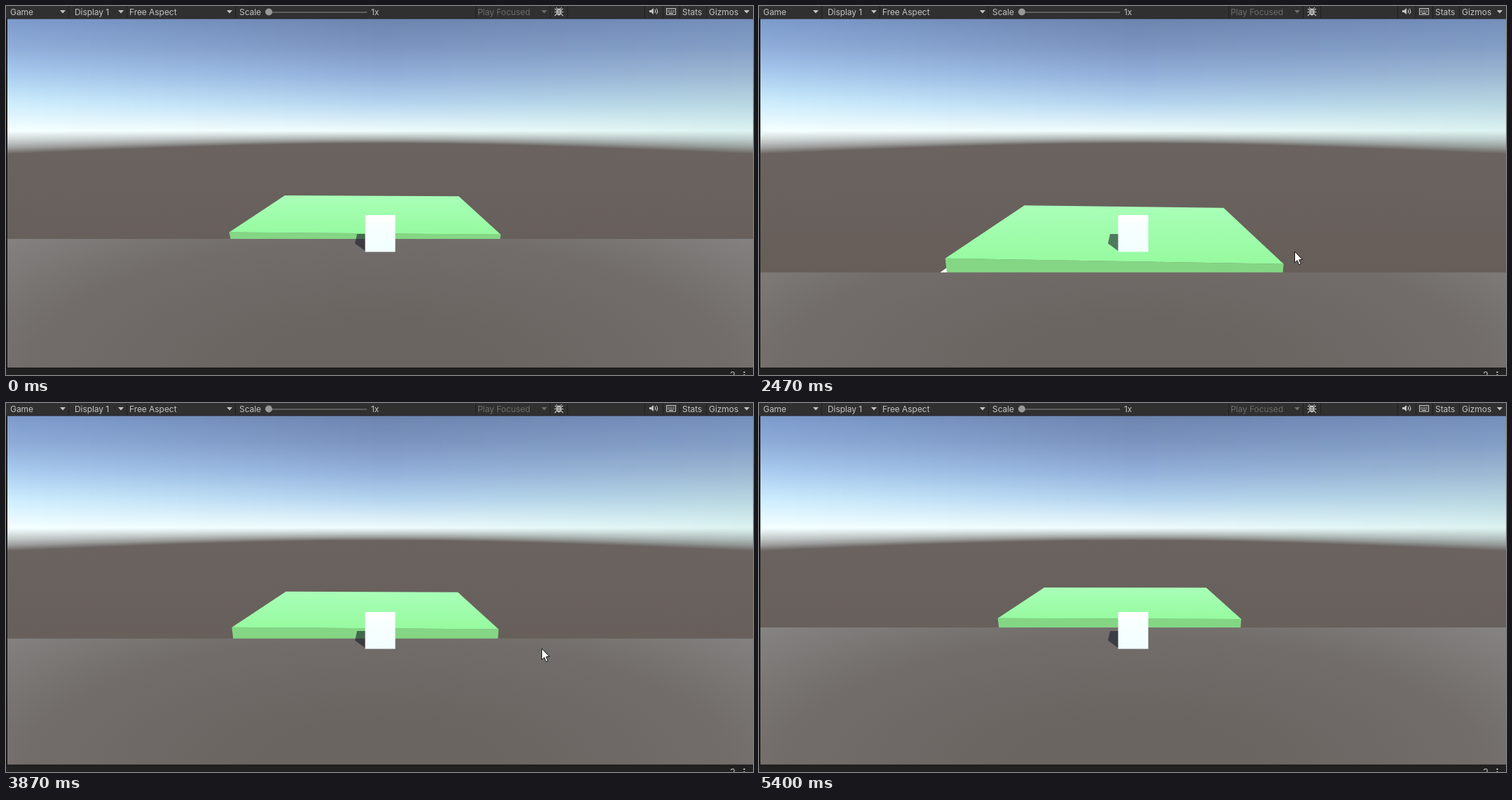
These frames come from a looping animation (1066 by 526 pixels, 5.8 s). An HTML page with a canvas:

```html
<!DOCTYPE html>
<html lang="en">
<head>
<meta charset="utf-8">
<title>Game view</title>
<style>
  html, body { margin: 0; width: 100%; height: 100%; overflow: hidden; background: #191919; }
  canvas, svg { position: absolute; left: 0; top: 0; display: block; }
  text { font: 12px Inter, Roboto, sans-serif; letter-spacing: -.06px; fill: #c4c4c4; }
  .dim { fill: #6c6c6c; }
  .icon { fill: #c4c4c4; }
  .line { fill: none; stroke: #c4c4c4; stroke-width: 1.1; }
</style>
</head>
<body>
<canvas id="scene" width="1066" height="526"></canvas>
<svg width="1066" height="526" viewBox="0 0 1066 526">
  <defs><path id="arrow" d="M0 0h8l-4 4.5z"/></defs>
  <rect width="1066" height="18" fill="#303030"/>
  <rect y="17.5" width="1066" height="1" fill="#222"/>
  <path d="M89.5 0V17M172.5 0V17M327.5 0V17M670.5 0V17M776.5 0V17M801.5 0V17M911.5 0V17M937.5 0V17M961.5 0V17M999.5 0V17" stroke="#202020"/>
  <text x="6" y="12.5">Game</text>
  <text x="98" y="12.5">Display 1</text>
  <text x="176" y="12.5">Free Aspect</text>
  <text x="333" y="12.5">Scale</text>
  <text x="521" y="12.5">1x</text>
  <text x="673" y="12.5" class="dim">Play Focused</text>
  <text x="965" y="12.5">Stats</text>
  <text x="1003" y="12.5">Gizmos</text>
  <g class="icon">
    <use href="#arrow" x="77" y="6"/>
    <use href="#arrow" x="160" y="6"/>
    <use href="#arrow" x="315" y="6"/>
    <use href="#arrow" x="1053" y="6"/>
  </g>
  <use href="#arrow" x="764" y="6" class="dim"/>
  <rect x="376" y="8" width="139" height="2" fill="#5e5e5e"/>
  <circle cx="375" cy="8.5" r="5" fill="#999"/>
  <ellipse class="icon" cx="789" cy="8.5" rx="3.6" ry="5"/>
  <path class="line" d="M785 2l2 2.5M793 2l-2 2.5M783 4l3 2M795 4l-3 2M782.5 8.5h13M783 14l3-3M795 14l-3-3"/>
  <path d="M787 7h4M787 10h4" stroke="#303030"/>
  <path class="icon" d="M918 6h2.5l3.5-3v9l-3.5-3H918z"/>
  <path class="line" d="M926 5q2 2.5 0 5M928 3.5q3.5 4 0 8"/>
  <rect class="line" x="942.6" y="3.6" width="13" height="8.5"/>
  <path class="line" d="M944 6.2h10M944 8.4h10" stroke-dasharray="1.6 1.1"/>
  <path class="line" d="M946 10.4h6"/>
  <rect y="516" width="1066" height="10" fill="#212121"/>
  <rect y="515.5" width="1066" height="1.5" fill="#151515"/>
  <path class="line" d="M1034.5 523.5q.5-2 2.5-2t2.5 2.5l-1 2"/>
  <path class="icon" d="M1052.5 521h2v2h-2zM1052.5 525h2v1h-2z"/>
</svg>
<script>
const LOOP = 5800, STEP = 70;
const W = 1066, MID = 533, TOP = 18, FLOOR = 516;
const VANISH = 155, SKYLINE = 178;
const SHADE = 'rgba(20,25,38,.58)';
const ctx = document.getElementById('scene').getContext('2d');

const mix = (a, b, p) => a + (b - a) * p;
const part = (t, from, to) => Math.max(0, Math.min(1, (t - from) / (to - from)));
const glide = (t, from, to) => {
  const p = part(t, from, to);
  return p * p * (3 - 2 * p);
};

// Distance of the ground's far edge: pushes nearer and farther, each eased
function distance(t) {
  return 5.65
    - 1.20 * glide(t, 1500, 2330)
    + 1.62 * glide(t, 2750, 3520)
    - 2.24 * glide(t, 3630, 4350)
    + 2.23 * glide(t, 4350, 5330);
}

function pointer(t) {
  const enter = glide(t, 390, 1020), move = glide(t, 1280, 1760);
  return [mix(900, 834.5, enter) - 70 * move, mix(438, 390.5, enter) - 40.5 * move];
}

function trace(points) {
  ctx.beginPath();
  points.forEach(([x, y]) => ctx.lineTo(x, y));
  ctx.closePath();
}

function poly(fill, ...points) {
  trace(points);
  ctx.fillStyle = fill;
  ctx.fill();
}

function vertical(y0, y1, from, to) {
  const grad = ctx.createLinearGradient(0, y0, 0, y1);
  grad.addColorStop(0, from);
  grad.addColorStop(1, to);
  return grad;
}

const palette = s => s.split(' ').map(hex => [0, 2, 4].map(i => parseInt(hex.substr(i, 2), 16)));
const blend = (a, b, p) => a.map((v, k) => Math.round(mix(v, b[k], p)));
// Blend as light rather than as screen values
const blendLight = (a, b, p) =>
  a.map((v, k) => Math.round(mix(v ** 2.2, b[k] ** 2.2, p) ** (1 / 2.2)));

function makeSky() {
  const canvas = document.createElement('canvas');
  canvas.width = W;
  canvas.height = FLOOR;
  const g = canvas.getContext('2d');
  const left = palette('7c9acb 8facd9 a9ccef cdedfd f5ffff');
  const mid = palette('6c84ae 7b95c0 92afd9 b4d4ef effcfc');
  const right = palette('738fbb 839ec5 9bb7d2 b7d6e1 dcf3f1');
  const [soil, deep] = palette('6a6360 665d58');
  for (let x = 0; x < W; x += 2) {
    const u = (x - MID) / MID;
    const grad = g.createLinearGradient(0, TOP, 0, FLOOR);
    const stop = (y, c) => grad.addColorStop((y - TOP) / (FLOOR - TOP), `rgb(${c})`);
    const colours = mid.map((c, i) => blend(c, (u < 0 ? left : right)[i], Math.abs(u)));
    colours.forEach((c, i) => stop(mix(TOP, SKYLINE, i / 4), c));
    // The haze ends on a cone around the viewer, so its rim is a hyperbola
    const haze = 18 * Math.sqrt(1 + 2.4 * u * u);
    for (let p = 0.25; p <= 1; p += 0.25) stop(SKYLINE + haze * p, blendLight(colours[4], soil, p));
    stop(410, deep);
    g.fillStyle = grad;
    g.fillRect(x, TOP, 2, FLOOR - TOP);
  }
  return canvas;
}
const sky = makeSky();

function drawGround(edge) {
  ctx.save();
  ctx.beginPath();
  ctx.rect(0, edge, W, FLOOR - edge);
  ctx.clip();
  ctx.translate(MID, FLOOR);
  ctx.scale(900, 330);
  const grad = ctx.createRadialGradient(0, 0, 0, 0, 0, 1);
  grad.addColorStop(0.2, '#6b6562');
  grad.addColorStop(0.56, '#726d6a');
  grad.addColorStop(0.83, '#858382');
  ctx.fillStyle = grad;
  ctx.fillRect(-1, -1, 2, 1);
  ctx.restore();
}

function drawSlab(near, edge) {
  const corner = (side, depth, horizon, drop) => {
    const s = 1000 / (1000 / near + depth);
    return [MID + side * s, horizon + drop * s];
  };
  const backLeft = corner(-1.16, 3.16, 169.5, 0.863);
  const backRight = corner(0.938, 2.86, 159, 0.93);
  const frontRight = corner(0.94, 0, 155, 0.927);
  const frontLeft = corner(-1.165, 0, 171, 0.823);
  const baseLeft = [MID - 1.155 * near, edge];
  const baseRight = [MID + 0.935 * near, edge];
  const face = [frontLeft, frontRight, baseRight, baseLeft];

  // White corner showing from beneath
  const chip = 0.16 * (near - 170);
  if (chip > 3) poly('#fff', [baseLeft[0] - chip, edge], [baseLeft[0], edge - chip * 0.7], baseLeft);
  poly('#84d684', ...face);
  poly(vertical(backLeft[1], frontRight[1], '#a9ffb8', '#96fa9f'),
    backLeft, backRight, frontRight, frontLeft);

  // Cube shadow falling down the front face
  const rim = mix(frontLeft[1], frontRight[1], 0.55);
  if (rim < 350 && edge > 345) {
    ctx.save();
    trace(face);
    ctx.clip();
    poly(SHADE, [505, 344], [552, 344], [547, 359], [506, 359]);
    ctx.restore();
  }
}

function drawCube() {
  poly(SHADE, [501, 325], [514, 325], [514, 350], [511, 348], [498, 338.5]);
  poly(vertical(308, 350, '#f8ffff', '#f2fffe'), [512.5, 298], [555.5, 298], [555.5, 350.5], [512.5, 350.5]);
  poly('#fff', [514, 298], [554.5, 298], [555.5, 308], [512.5, 308]);
}

function drawPointer([x, y]) {
  ctx.save();
  ctx.translate(x, y);
  poly('#fff', [0, 0], [0, 16], [3.7, 12.7], [6.2, 18.8], [8.8, 17.7], [6.3, 11.8], [11, 11.5]);
  ctx.strokeStyle = '#111';
  ctx.stroke();
  ctx.restore();
}

function draw(now) {
  const real = now % LOOP;
  const shift = real < 1280 ? 40 : 10;
  const t = Math.floor((real - shift) / STEP) * STEP + shift;
  const scale = 1000 / distance(t);
  const edge = VANISH + scale;
  // The slab starts a little ahead of the edge and settles back onto it
  const lead = 0.04 * (1 - part(t, 1500, 3500));

  ctx.drawImage(sky, 0, 0);
  drawGround(edge);
  drawSlab(scale * (1 + lead), edge);
  drawCube();
  if (t >= 390 && t < 4900) drawPointer(pointer(t));
  ctx.fillStyle = '#191919';
  ctx.fillRect(0, TOP, 2, FLOOR - TOP + 10);
}

function tick() {
  draw(performance.now());
  requestAnimationFrame(tick);
}
tick();
</script>
</body>
</html>
```
